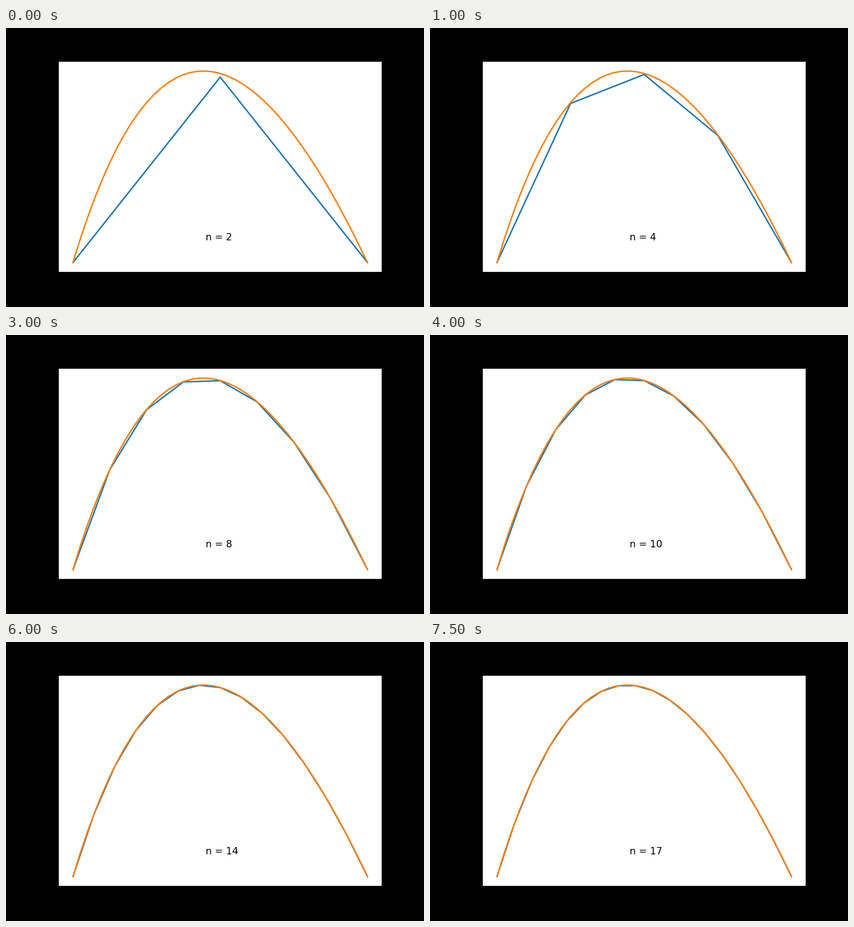
These frames come from a looping animation (917x611 px, 8000 ms). A matplotlib script:

```python
import numpy as np
import matplotlib.pyplot as plt
from matplotlib.animation import FuncAnimation

WIDTH, HEIGHT, DPI = 917, 611, 128
SCALE = WIDTH / 6 / DPI  # point sizes refer to a six inch wide figure
FIRST_N, LAST_N = 2, 17


def exact(x):
    """Solution of -((1 + x) u')' = 1 with u(0) = u(1) = 0."""
    return np.log2(1 + x) - x


def approximate(n):
    """Finite difference solution on n equal cells."""
    x = np.linspace(0, 1, n + 1)
    mid = (x[1:] + x[:-1]) / 2
    s = np.concatenate([[0], np.cumsum(1 / (1 + mid))])
    return x, s / s[-1] - x


fig = plt.figure(figsize=(WIDTH / DPI, HEIGHT / DPI), dpi=DPI, facecolor="black")
ax = fig.add_axes([0.125, 0.125, 0.775, 0.755])
ax.set(xticks=[], yticks=[])
for spine in ax.spines.values():
    spine.set_linewidth(0.8 * SCALE)

grid = np.linspace(0, 1, 41)
peak = exact(grid).max()
ax.set_xlim(-0.05, 1.05)
ax.set_ylim(-0.05 * peak, 1.05 * peak)

approx_line, = ax.plot([], [], color="C0", lw=1.5 * SCALE)
ax.plot(grid, exact(grid), color="C1", lw=1.5 * SCALE)
label = ax.text(0.45, 0.01, "", fontsize=10 * SCALE, family="DejaVu Sans")


def update(frame):
    n = FIRST_N + frame
    approx_line.set_data(*approximate(n))
    label.set_text(f"n = {n}")
    return approx_line, label


anim = FuncAnimation(fig, update, frames=LAST_N - FIRST_N + 1, interval=500,
                     repeat=True, repeat_delay=0)
plt.show()
```
